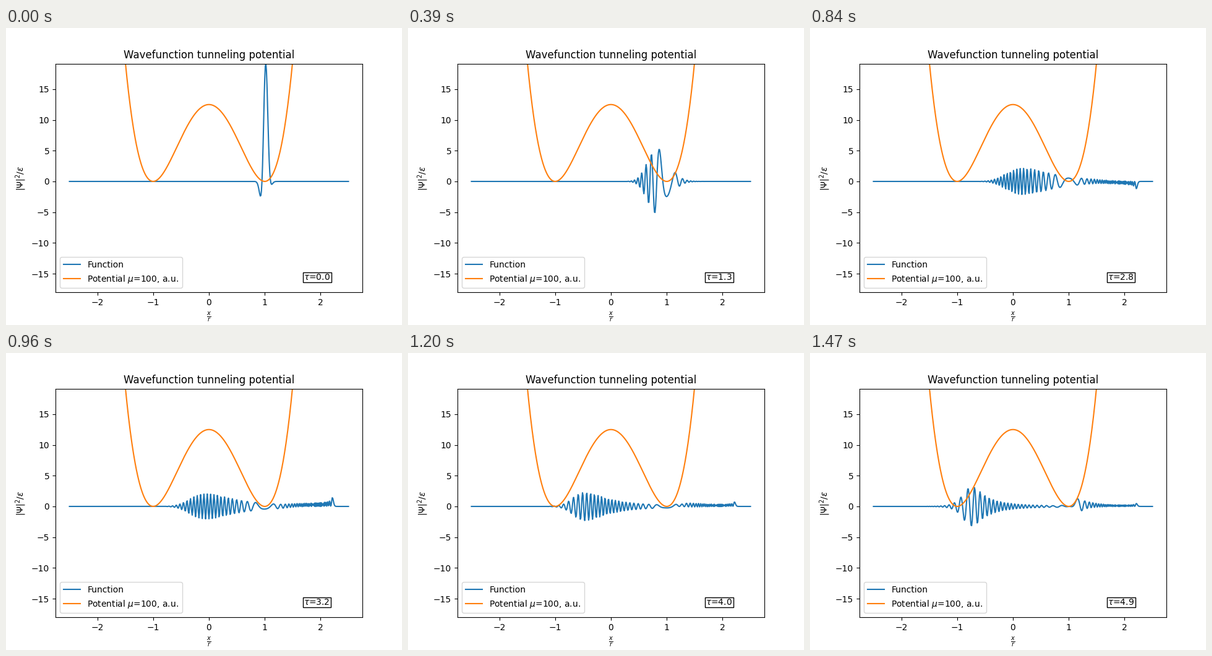
These frames come from a looping animation (640 px wide and 480 px high, 1.5 s). A matplotlib script:

```python
import numpy as np
import matplotlib.pyplot as plt
from matplotlib.animation import FuncAnimation

MU = 100
DX = 0.01
DT = 0.1
FRAMES = 50

# Double well and its finite-difference Hamiltonian
x = np.linspace(-2.5, 2.5, 501)
potential = MU / 8 * (x**2 - 1)**2
hop = 1 / (2 * MU * DX**2)
off = np.full(x.size - 1, -hop)
hamiltonian = np.diag(potential + 2 * hop) + np.diag(off, 1) + np.diag(off, -1)
energy, modes = np.linalg.eigh(hamiltonian)

# Narrow packet in the right well, with momentum near the grid limit
CENTER, SIGMA, WAVE, CREST = 1.0078, 0.0494, 10.15, 1.0275
stagger = (-1.0)**np.arange(x.size)
envelope = np.sqrt(20) * np.exp(-((x - CENTER) / (2 * SIGMA))**2)
packet = stagger * envelope * np.exp(1j * WAVE * (x - CREST))
weights = modes.T @ packet


def wave(tau):
    psi = modes @ (weights * np.exp(-1j * energy * tau))
    return (psi**2).real


def tau_label(tau):
    return rf"$\tau$={tau:.1f}"


fig, ax = plt.subplots(figsize=(6.4, 4.8), dpi=100)
line, = ax.plot(x, wave(0), label="Function")
ax.plot(x, potential, label=rf"Potential $\mu$={MU}, a.u.")
ax.set_xlim(-2.75, 2.75)
ax.set_ylim(-18.03, 19.15)
ax.set_title("Wavefunction tunneling potential")
ax.set_xlabel(r"$\frac{x}{r}$")
ax.set_ylabel(r"$|\Psi|^2/\varepsilon$")
ax.legend(loc="lower left")
clock = ax.text(1.7, -16, tau_label(0), bbox=dict(facecolor="white", pad=1))


def update(i):
    tau = i * DT
    line.set_ydata(wave(tau))
    clock.set_text(tau_label(tau))
    return line, clock


anim = FuncAnimation(fig, update, frames=FRAMES, interval=30, repeat=True,
                     repeat_delay=0)
plt.show()
```
